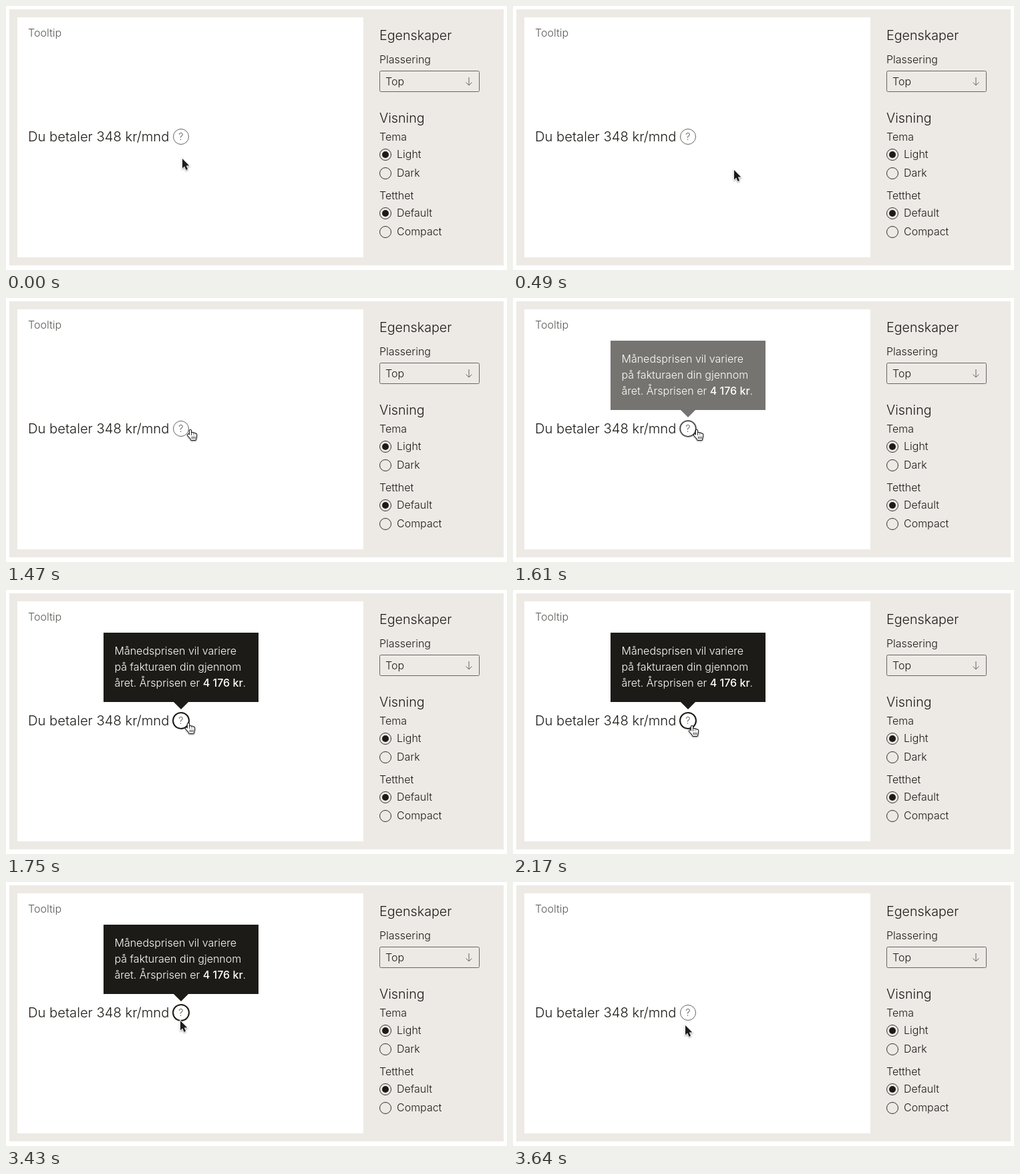
These frames come from a looping animation (750 by 396 pixels, 3.71 s). An HTML page:

```html
<!DOCTYPE html>
<html lang="no">
<head>
<meta charset="utf-8">
<title>Tooltip</title>
<style>
  html, body { margin: 0; width: 100%; height: 100%; overflow: hidden; background: #fff; }
  svg { display: block; width: 750px; height: 396px; font: 300 16px Inter, sans-serif; fill: #1d1b17; }
  .price { font-size: 20.2px; }
  .heading { font-size: 19.7px; }
  .muted { fill: #5c5a57; }
  .line { fill: none; stroke: #33312e; }
  .soft { stroke: #666461; }
  .ring { stroke: #1d1b17; stroke-width: 2; }
  .bubble { fill: #fff; }
  .bubble tspan { font-weight: 500; }
  #cursor { filter: drop-shadow(0 1px 1px #0006); }
  #arrow { stroke: #fff; stroke-width: 1.6; paint-order: stroke; }
  #hand { stroke-linecap: round; stroke-linejoin: round; }
</style>
</head>
<body>
<svg viewBox="0 0 750 396">
  <path fill="#edeae6" d="M5 5h740v384H5z"/>
  <path fill="#fff" d="M17 17h518v360H17z"/>

  <text class="muted" x="33" y="46">Tooltip</text>
  <text class="price" x="33" y="203">Du betaler 348 kr/mnd</text>

  <text class="heading" x="559" y="51">Egenskaper</text>
  <text x="559" y="86">Plassering</text>
  <rect class="line soft" x="559.5" y="97.5" width="149" height="31" rx="2"/>
  <text x="568" y="119">Top</text>
  <path class="line soft" d="M693 107v12m-4.5-4.5 4.5 4.5 4.5-4.5"/>

  <text class="heading" x="559" y="175">Visning</text>
  <g id="options"></g>

  <circle class="line soft" cx="262" cy="196" r="11.5"/>
  <text class="muted" x="262" y="201" text-anchor="middle" font-size="14.5">?</text>

  <g id="hover">
    <circle class="line ring" cx="262" cy="196" r="12"/>
    <path d="M146 64h232v104H273l-11 11-11-11H146z"/>
    <g id="lines" class="bubble"></g>
  </g>

  <g id="cursor">
    <path id="arrow" d="M0 0V14.5l3.2-3 2.4 5.4 2.5-1.1-2.3-5.2h4.5z"/>
    <g id="hand">
      <path id="fingers" stroke="#111" stroke-width="4.2" d="M0 2V10M3 6v4M5.6 6.5V10M8 7.5V11M-3 8.5 0 12M0 10H8L7 15H2z"/>
      <use href="#fingers"/>
      <path class="line" d="M2.5 11v3m2.2-3v3m2.2-3v3"/>
    </g>
  </g>
</svg>
<script>
const LOOP = 3710, STEP = 70;
const $ = id => document.getElementById(id);
const ramp = (t, from, to) => Math.min(1, Math.max(0, (t - from) / (to - from)));
const easeOut = k => k * (2 - k);
const text = (x, y, content) => `<text x="${x}" y="${y}">${content}</text>`;

const radio = (y, label, checked) =>
  `<circle class="line" cx="568" cy="${y}" r="8.5"/>` +
  (checked ? `<circle cx="568" cy="${y}" r="5"/>` : '') +
  text(585, y + 5, label);

const radioGroup = (y, title, labels) =>
  text(559, y, title) + labels.map((label, i) => radio(y + 21 + 28 * i, label, i === 0)).join('');

$('options').innerHTML =
  radioGroup(202, 'Tema', ['Light', 'Dark']) +
  radioGroup(290, 'Tetthet', ['Default', 'Compact']);

$('lines').innerHTML = [
  'Månedsprisen vil variere',
  'på fakturaen din gjennom',
  'året. Årsprisen er <tspan>4 176 kr</tspan>.'
].map((line, i) => text(162.5, 97 + 24 * i, line)).join('');

// A white copy, drawn thinner, leaves a dark outline around the hand
const inner = $('fingers').cloneNode();
inner.removeAttribute('id');
inner.setAttribute('style', 'fill:#fff;stroke:#fff;stroke-width:2.2');
$('hand').querySelector('use').replaceWith(inner);

// Pointer stops: time, x, y
const stops = [
  [0, 264, 229], [490, 331, 246], [600, 336, 232], [1120, 283, 191],
  [1610, 275, 197], [3430, 261, 208], [LOOP, 258, 215]
];

function pointerAt(t) {
  const next = stops.findIndex(stop => stop[0] > t);
  const [t0, ...from] = stops[next - 1], [t1, ...to] = stops[next];
  const k = easeOut(ramp(t, t0, t1));
  return from.map((v, i) => Math.round(v + (to[i] - v) * k));
}

function draw() {
  const t = Math.floor((performance.now() % LOOP + 2) / STEP) * STEP % LOOP;
  const pointing = t >= 1330 && t < 3220;
  $('hover').setAttribute('opacity', ramp(t, 1470, 1700) * (1 - ramp(t, 3430, 3600)));
  $('cursor').setAttribute('transform', `translate(${pointerAt(t)})`);
  $('hand').style.display = pointing ? '' : 'none';
  $('arrow').style.display = pointing ? 'none' : '';
  requestAnimationFrame(draw);
}
draw();
</script>
</body>
</html>
```
